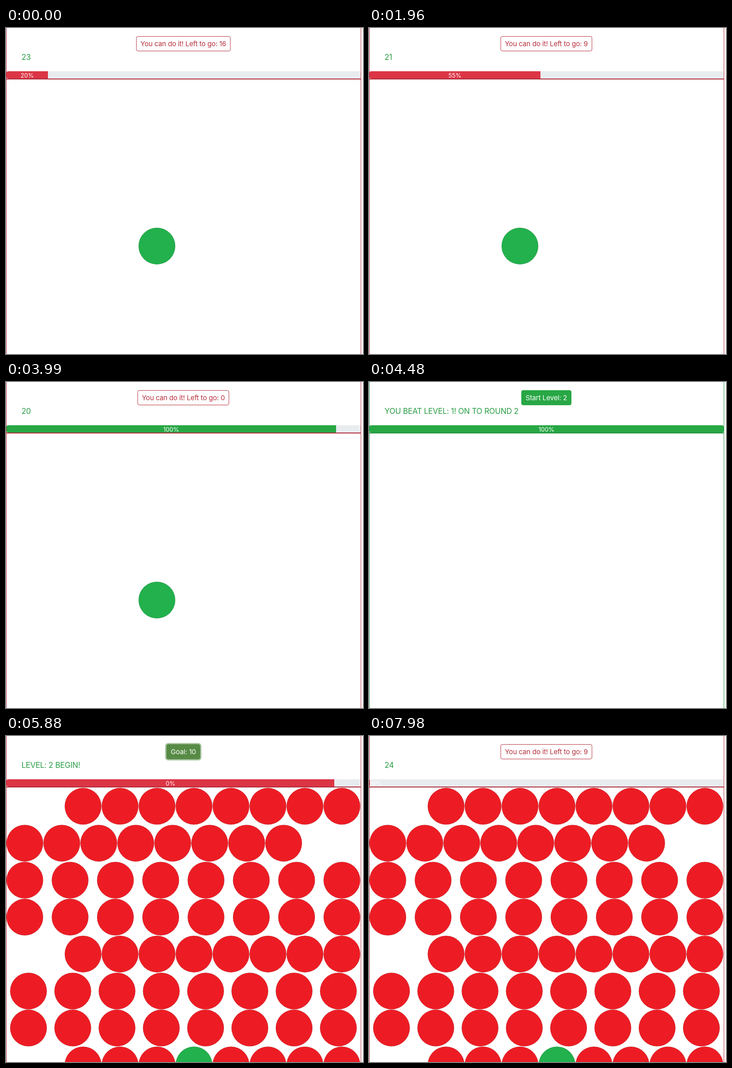
An HTML page for the animation above (8000 ms loop, 783 by 716 pixels).

```html
<!DOCTYPE html>
<html lang="en">
<head>
<meta charset="utf-8">
<title>Click the green dot</title>
<style>
  html, body { margin: 0; width: 100%; height: 100%; overflow: hidden; background: #fff; }
  #stage {
    position: relative; width: 783px; height: 716px; overflow: hidden;
    font-family: Inter, "Liberation Sans", sans-serif; --line: #b02c3a;
  }
  #stage > * { position: absolute; }
  #dots { left: 0; top: 0; }
  #dots circle { stroke: #000; stroke-opacity: .18; stroke-width: .8; }
  .side { top: 0; width: 1px; height: 716px; background: var(--line); }
  .rule { left: 0; top: 111px; width: 779px; height: 2px; background: var(--line); }
  #button {
    left: 389px; top: 17.5px; height: 33.5px; box-sizing: border-box;
    transform: translateX(-50%); padding: 0 8.5px; border: 1px solid; border-radius: 4px;
    font-size: 15px; line-height: 31.5px; letter-spacing: -.01em; white-space: nowrap;
  }
  #status {
    left: 34px; top: 52px; line-height: 24px; font-size: 17px;
    letter-spacing: -.015em; white-space: nowrap; color: #2a9d45;
  }
  #track {
    left: 1px; top: 94.5px; width: 777px; height: 16.5px; overflow: hidden;
    border-radius: 4px; background: #e9ecef;
  }
  #bar {
    height: 100%; color: #fff; font-size: 13px; line-height: 18px;
    text-align: center; white-space: nowrap;
  }
</style>
</head>
<body>
<div id="stage">
  <svg id="dots" width="783" height="716"></svg>
  <div class="side" style="left:0"></div>
  <div class="side" style="left:778px"></div>
  <div id="track"><div id="bar"></div></div>
  <div class="rule"></div>
  <div id="status"></div>
  <div id="button"></div>
</div>
<script>
const LOOP = 8000, FULL = 777, GLIDE = 630, FADE = 158, TICK = 1050;
const WIN = 4050, FOCUS = 5600, START = 5827, BLUR = 7840, HIT = 7970;
const GREEN = [40, 167, 69], RED = [220, 53, 69];
const DARK_RED = '#b52f3b';

// click number, time, bar width at that moment
const PACE = [[0, 0, 91], [7, 1945, 374], [12, 3065, 551], [16, 3915, 714.6]];

const $ = id => document.getElementById(id);
const stage = $('stage'), button = $('button'), status = $('status'), bar = $('bar'), dots = $('dots');
const clamp = v => Math.min(1, Math.max(0, v));
const lerp = (a, b, p) => a + (b - a) * p;
const mix = (a, b, p) => a.map((v, i) => Math.round(lerp(v, b[i], p)));
const rgb = (c, alpha = 1) => `rgba(${c},${alpha})`;

// cubic-bezier(.25, .1, .25, 1)
function ease(x) {
  if (x <= 0) return 0;
  if (x >= 1) return 1;
  let lo = 0, hi = 1;
  for (let i = 0; i < 24; i++) {
    const s = (lo + hi) / 2;
    if (.75 * s * (1 - s) + s ** 3 < x) lo = s; else hi = s;
  }
  return .3 * lo * (1 - lo) ** 2 + 3 * lo * lo * (1 - lo) + lo ** 3;
}

const clicks = [];
for (let i = 0; i < PACE.length - 1; i++) {
  const [n0, t0, w0] = PACE[i], [n1, t1, w1] = PACE[i + 1];
  for (let n = n0; n < n1; n++) {
    const p = (n - n0) / (n1 - n0);
    clicks.push({ t: lerp(t0, t1, p), w: lerp(w0, w1, p) });
  }
}
clicks.push({ t: PACE[3][1], w: PACE[3][2] }, { t: PACE[3][1] + GLIDE, w: FULL });
const LAST = clicks.length - 2;

function clickIndex(t) {
  let n = 0;
  while (n < LAST && clicks[n + 1].t <= t) n++;
  return n;
}

function barWidth(t) {
  if (t >= HIT) return FULL * .1 * ease((t - HIT) / GLIDE);
  if (t >= START) return FULL * (1 - ease((t - START) / GLIDE));
  const n = clickIndex(t), a = clicks[n], b = clicks[n + 1];
  return lerp(a.w, b.w, clamp(ease((t - a.t) / GLIDE) / ease((b.t - a.t) / GLIDE)));
}

function addDot(parent, x, y, fill) {
  const c = document.createElementNS('http://www.w3.org/2000/svg', 'circle');
  const attrs = { cx: x, cy: y, r: 40.2, fill };
  for (const k in attrs) c.setAttribute(k, attrs[k]);
  return parent.appendChild(c);
}

// first centre and spacing for each way a row is justified
const ROWS = { end: [169, 81.1], start: [41.2, 81.1], between: [41.2, 99.36], around: [49.3, 97.1] };
const LAYOUT = ['end', 'start', 'between', 'between', 'end', 'around', 'around', 'end'];
const rowY = r => 154.3 + 81.17 * r;
const board = dots.appendChild(document.createElementNS('http://www.w3.org/2000/svg', 'g'));
LAYOUT.forEach((kind, r) => {
  const [x, step] = ROWS[kind];
  for (let i = 0; i < 8; i++)
    addDot(board, x + step * i, rowY(r), r === 7 && i === 3 ? '#22b14c' : '#ed1c24');
});
const single = addDot(dots, 331, rowY(4), '#22b14c');

function setText(el, text) {
  if (el.textContent !== text) el.textContent = text;
}

function outlineButton(left) {
  setText(button, `You can do it! Left to go: ${left}`);
  Object.assign(button.style, { color: DARK_RED, background: '#fff', borderColor: DARK_RED, boxShadow: 'none' });
}

function solidButton(text, color, ring) {
  setText(button, text);
  Object.assign(button.style, {
    color: '#fff', background: rgb(color), borderColor: rgb(color),
    boxShadow: `0 0 0 2.8px ${rgb(color, .5 * ring)}`
  });
}

function draw(t) {
  const n = clickIndex(t), won = t >= WIN && t < START, level2 = t >= START;
  const green = n === LAST && !level2;

  single.style.display = t < WIN ? '' : 'none';
  board.style.display = level2 ? '' : 'none';
  stage.style.setProperty('--line', won ? '#2a9447' : '#b02c3a');

  bar.style.width = barWidth(t) + 'px';
  bar.style.background = rgb(green ? GREEN : RED);
  setText(bar, level2 ? (t < HIT ? '0%' : '10%') : `${20 + 5 * n}%`);

  if (t < WIN) {
    const ticks = Math.floor((Math.min(t, clicks[LAST].t) - 835) / TICK) + 1;
    setText(status, String(23 - ticks));
    outlineButton(LAST - n);
  } else if (won) {
    setText(status, 'YOU BEAT LEVEL: 1! ON TO ROUND 2');
    const color = mix(RED, GREEN, ease((t - WIN) / FADE));
    solidButton('Start Level: 2', color, ease((t - FOCUS) / FADE));
  } else {
    setText(status, t < 6910 ? 'LEVEL: 2 BEGIN!' : t < 6910 + TICK ? '25' : '24');
    if (t >= HIT) outlineButton(9);
    else {
      const color = mix(GREEN, RED, ease((t - START - 25) / FADE));
      solidButton('Goal: 10', color, 1 - ease((t - BLUR) / FADE));
    }
  }
}

const begin = performance.now();
function frame() {
  draw((performance.now() - begin) % LOOP);
  requestAnimationFrame(frame);
}
draw(0);
requestAnimationFrame(frame);
</script>
</body>
</html>
```
